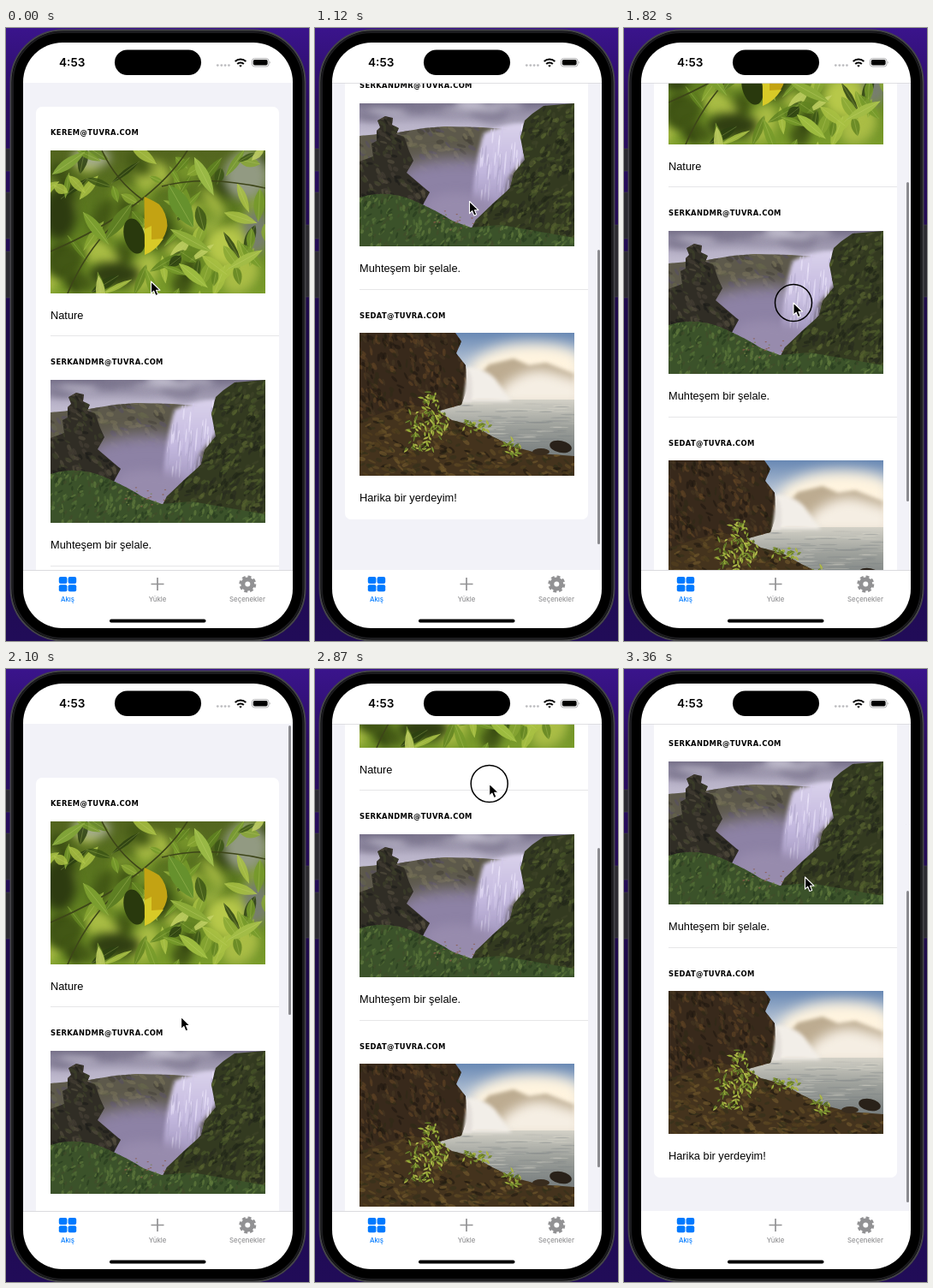
An HTML page with a canvas for the animation above (3.43 s loop, 354 by 716 pixels).

```html
<!DOCTYPE html>
<html lang="tr">
<head>
<meta charset="utf-8">
<title>Akış</title>
<style>
html, body { margin: 0; width: 100%; height: 100%; overflow: hidden; }
#stage { position: relative; width: 354px; height: 716px; overflow: hidden; }
#stage > svg { position: absolute; left: 0; top: 0; }
#view { position: absolute; left: 20px; top: 64px; width: 315px; height: 569px; overflow: hidden; background: #f2f2f8; }
#card { position: absolute; left: 15px; top: 28px; width: 284px; height: 805.2px; border-radius: 7px; background: #fff; will-change: transform; }
.row { position: relative; height: 268.4px; color: #000; white-space: nowrap; }
.row > * { position: absolute; left: 17px; }
.mail { top: 24.1px; font: bold 8.4px/12px "DejaVu Sans", sans-serif; letter-spacing: .35px; }
.row canvas { top: 50.5px; width: 251px; height: 167px; }
.note { top: 235.6px; font: 12.8px/16px "Liberation Sans", Arial, sans-serif; }
.row:not(:last-child)::after { content: ""; position: absolute; left: 17px; right: 0; bottom: 0; height: 1px; background: #e6e6e8; }
#thumb { position: absolute; left: 309.8px; width: 2.8px; border-radius: 2px; background: #8b8b90; }
text { font-family: Inter, sans-serif; }
.tab text { font-size: 7.8px; font-weight: 500; text-anchor: middle; }
</style>
</head>
<body>
<div id="stage">
  <svg width="354" height="716">
    <defs>
      <linearGradient id="wall" x2="0" y2="1">
        <stop offset="0" stop-color="#3a148c"/><stop offset=".12" stop-color="#2b0d63"/>
        <stop offset=".5" stop-color="#1d0a48"/><stop offset="1" stop-color="#210c58"/>
      </linearGradient>
    </defs>
    <rect width="354" height="716" fill="url(#wall)"/>
    <g fill="#2c2b31" stroke="#46454b" stroke-width=".6">
      <rect x="-3" y="141" width="9" height="26" rx="1.5"/>
      <rect x="-3" y="192" width="9" height="54" rx="1.5"/>
      <rect x="-3" y="261" width="9" height="54" rx="1.5"/>
      <rect x="348" y="230" width="9" height="84" rx="1.5"/>
    </g>
    <rect x="5.5" y="2.5" width="344" height="713" rx="61" stroke="#454549" stroke-width="2"/>
    <rect x="8" y="5" width="339" height="708" rx="58" fill="none" stroke="#1c1c1f" stroke-width="2"/>
    <rect x="20" y="17" width="315" height="684" rx="46" fill="#fff"/>
  </svg>

  <div id="view"><div id="card"></div><div id="thumb"></div></div>

  <svg width="354" height="716">
    <path id="topLine" d="M20 64.5H335" stroke="#d8d8dc" stroke-width=".8"/>
    <path id="tabLine" d="M20 633.5H335" stroke="#d2d2d6" stroke-width=".8"/>
    <text x="62" y="45" font-size="13.6" font-weight="600">4:53</text>
    <rect x="127" y="25.5" width="101" height="29.5" rx="14.75"/>
    <g fill="#bdbdc0">
      <circle cx="247.3" cy="43.6" r="1.4"/><circle cx="251.8" cy="43.6" r="1.4"/>
      <circle cx="256.1" cy="43.6" r="1.4"/><circle cx="260.4" cy="43.6" r="1.4"/>
    </g>
    <g fill="none" stroke="#000" stroke-width="2">
      <path d="M267.7 39a9 9 0 0 1 12.6 0M270.2 42a5.4 5.4 0 0 1 7.6 0"/>
      <path d="M272.2 43.8L274 45.8L275.8 43.8Q274 42.6 272.2 43.8" fill="#000" stroke="none"/>
    </g>
    <rect x="287.4" y="35.6" width="19.6" height="9.4" rx="3" fill="none" stroke="#a5a5a7" stroke-width=".9"/>
    <rect x="288.8" y="37" width="16.8" height="6.6" rx="1.8"/>
    <path d="M308 38.8q1.6 1.5 0 3z" fill="#a5a5a7"/>

    <g class="tab" fill="#007aff">
      <rect x="61.8" y="641" width="9.6" height="8" rx="2"/><rect x="72.6" y="641" width="9.6" height="8" rx="2"/>
      <rect x="61.8" y="650.2" width="9.6" height="8" rx="2"/><rect x="72.6" y="650.2" width="9.6" height="8" rx="2"/>
      <text x="72" y="670">Akış</text>
    </g>
    <g class="tab" fill="#929294">
      <path d="M169.5 649.5h15M177 642v15" stroke="#929294" stroke-width="1.7"/>
      <text x="177" y="670">Yükle</text>
      <circle cx="282.3" cy="649.5" r="5.5" fill="none" stroke="#929294" stroke-width="5"/>
      <circle cx="282.3" cy="649.5" r="8.6" fill="none" stroke="#929294" stroke-width="2.8" stroke-dasharray="3.9 2.855"/>
      <text x="282" y="670">Seçenekler</text>
    </g>
    <rect x="121" y="690.6" width="112.5" height="3.8" rx="1.9"/>
    <g id="cursor">
      <circle id="touch" r="21.5" fill="#fff" fill-opacity=".12" stroke="#000" stroke-width="1.5"/>
      <path d="M0 0V14.2L3.2 11.2L5.4 16.6L8.2 15.4L6 10.2H10.4Z" stroke="#fff" stroke-width="1.1" stroke-linejoin="round"/>
    </g>
  </svg>
</div>

<script>
const $ = id => document.getElementById(id);
const W = 251, H = 167;
let seed = 7;
const rnd = (a = 0, b = 1) => {
  seed = (seed * 16807) % 2147483647;
  return a + (b - a) * seed / 2147483647;
};
const pick = list => list[Math.floor(rnd(0, list.length))];

function shape(c, d, fill, blur = 0) {
  c.filter = blur ? `blur(${blur}px)` : 'none';
  c.fillStyle = fill;
  c.fill(new Path2D(d));
  c.filter = 'none';
}

function dot(c, x, y, rx, ry, turn, fill) {
  c.fillStyle = fill;
  c.beginPath();
  c.ellipse(x, y, rx, ry, turn, 0, 7);
  c.fill();
}

// Fills an outline, then roughens its inside with small random strokes.
function rough(c, d, fill, colors, n, size, turn = 0) {
  shape(c, d, fill);
  c.save();
  c.clip(new Path2D(d));
  c.globalAlpha = .6;
  for (let i = 0; i < n; i++)
    dot(c, rnd(0, W), rnd(0, H), rnd(.6, 1) * size, rnd(.2, .5) * size, turn + rnd(-.7, .7), pick(colors));
  c.restore();
}

function fade(c, y0, y1, ...colors) {
  const g = c.createLinearGradient(0, y0, 0, y1);
  colors.forEach((k, i) => g.addColorStop(i / (colors.length - 1), k));
  return g;
}

function leaf(c, x, y, len, wide, turn, fill) {
  c.save();
  c.translate(x, y);
  c.rotate(turn);
  shape(c, `M0 0Q${len * .45} ${-wide} ${len} 0Q${len * .45} ${wide} 0 0`, fill);
  c.strokeStyle = 'rgba(205,220,120,.4)';
  c.lineWidth = .7;
  c.beginPath();
  c.moveTo(0, 0);
  c.lineTo(len, 0);
  c.stroke();
  c.restore();
}

function leaves(c) {
  shape(c, 'M0 0H251V167H0z', fade(c, 0, H, '#53651f', '#5d7c20', '#7a9c2b'));
  const soft = ['#30400f', '#8aa43a', '#aabd45', '#425715', '#75932a'];
  c.filter = 'blur(6px)';
  for (let i = 0; i < 45; i++) dot(c, rnd(0, W), rnd(0, H), rnd(8, 24), rnd(6, 18), rnd(0, 3), pick(soft));
  dot(c, 48, 8, 22, 12, 0, '#a3aa8e');
  dot(c, 228, 30, 26, 28, 0, '#929a82');
  dot(c, 240, 95, 16, 26, 0, '#777d70');
  dot(c, 10, 75, 20, 30, 0, '#2d3b10');
  dot(c, 75, 145, 30, 14, 0, '#303e12');
  dot(c, 205, 112, 24, 24, 0, '#b7c84a');
  c.filter = 'none';
  const greens = ['#87a632', '#a9c143', '#618421', '#3b5515', '#769a2a', '#2c4011', '#c1d063'];
  c.globalAlpha = .85;
  for (let i = 0; i < 75; i++) leaf(c, rnd(-10, W), rnd(-10, H), rnd(18, 46), rnd(6, 13), rnd(.2, 2.7), pick(greens));
  c.globalAlpha = 1;
  c.strokeStyle = '#3d4518';
  c.lineWidth = 1.6;
  c.stroke(new Path2D('M0 118Q60 92 100 62T160 0M60 0Q76 35 108 58M130 42Q180 28 251 44M20 167Q40 120 72 88'));
  leaf(c, 2, 28, 46, 12, -.6, '#80a338');
  leaf(c, 38, 72, 48, 13, .9, '#7b9e2f');
  leaf(c, 95, 62, 52, 15, 2.2, '#5e7f23');
  leaf(c, 138, 40, 58, 22, 1.05, '#66912d');
  leaf(c, 168, 8, 50, 13, 1.1, '#98b845');
  leaf(c, 140, 92, 55, 12, .5, '#8dac39');
  leaf(c, 208, 138, 45, 11, -.5, '#a2bc46');
  leaf(c, 150, 132, 44, 12, .7, '#9cbb3f');
  dot(c, 98, 100, 12, 21, -.25, '#29390d');
  shape(c, 'M109.5 54Q121 59 127 63Q136 73 136.500 88Q134 108 110 122z', '#c3a313');
  shape(c, 'M110 92L118 88V104L132 103Q122 118 110 122z', '#d8ca27');
}

function falls(c) {
  shape(c, 'M0 0H251V80H0z', fade(c, 0, 50, '#77718a', '#b8b2c8', '#cbc6d8'));
  c.filter = 'blur(4px)';
  c.globalAlpha = .65;
  for (let i = 0; i < 16; i++) dot(c, rnd(0, 210), rnd(0, 22), rnd(12, 28), rnd(2, 5), .1, pick(['#666078', '#d8d4e2', '#918aa2']));
  c.filter = 'none';
  c.globalAlpha = 1;
  rough(c, 'M0 38L45 34L75 29L100 27L142 28L170 30L200 40V120H0z', '#5d594b', ['#777258', '#454238', '#67674b', '#575160'], 650, 6, .5);
  shape(c, 'M50 75Q90 60 140 65L180 85L165 145H60Q40 100 50 75', '#8d82a5', 9);
  shape(c, 'M145 35Q165 25 192 23L194 62L174 86L158 128H130Q135 65 145 35', fade(c, 25, 128, '#d9d1eb', '#c4b9df', '#9d91b9'), 2);
  c.save();
  c.clip(new Path2D('M143 32L193 23V72L158 128H130z'));
  c.globalAlpha = .55;
  for (let i = 0; i < 70; i++) dot(c, rnd(133, 193), rnd(28, 115), .9, rnd(5, 16), .08, pick(['#f2edff', '#aaa0c5', '#d4cbe9']));
  c.restore();
  shape(c, 'M80 112Q115 96 158 116V148H75z', '#978bad', 6);
  rough(c, 'M0 68L16 62L14 47L20 44L20 32L24 28L21 20L30 15L39 17L38 25L46 29L43 36L52 39L58 56L63 67L55 81L82 104L70 126H0z',
    '#302d25', ['#464036', '#1c1b18', '#3f412a', '#575040'], 700, 5, .8);
  rough(c, 'M251 0L215 3L202 12L193 20L188 40L193 66L180 82L176 99L157 116L136 136L128 152V167H251z',
    '#333a20', ['#1f2317', '#4b5a2a', '#404529', '#5b6731', '#282c1f'], 1200, 5, -.8);
  rough(c, 'M0 110Q32 100 62 113T108 137L130 145L165 142L251 157V167H0z',
    '#3b522a', ['#536e36', '#263a1d', '#678040', '#414b2b'], 1200, 4, -1.1);
  c.globalAlpha = .8;
  for (let i = 0; i < 22; i++) dot(c, rnd(85, 135), rnd(125, 148), 1.2, .7, 0, pick(['#8b5947', '#768347']));
  c.globalAlpha = 1;
}

function shore(c) {
  shape(c, 'M0 0H251V90H0z', fade(c, 0, 75, '#6888b4', '#b9c6d6', '#efe4d2'));
  shape(c, 'M130 36Q155 12 200 12T260 28V85H130z', '#fff4df', 8);
  shape(c, 'M135 55L151 37L180 30L198 38L218 35L251 48V82H135z', '#bdac91', 2);
  shape(c, 'M165 65Q195 37 225 46T260 56V86H160z', '#f5eee3', 7);
  shape(c, 'M90 78H251V148H90z', fade(c, 78, 140, '#d3d1c7', '#9da09b', '#7a8080'));
  c.globalAlpha = .3;
  for (let i = 0; i < 90; i++) dot(c, rnd(105, W), rnd(82, 130), rnd(6, 18), .7, 0, pick(['#e4e0d5', '#737c7d', '#b9bbb4']));
  c.globalAlpha = 1;
  shape(c, 'M122 41Q142 38 158 53L178 80H118z', '#f2eee8', 2);
  rough(c, 'M0 0H112L119 10L113 24L124 38L126 65L119 84L90 92L0 113z',
    '#38291b', ['#21180f', '#523b22', '#654725', '#463722', '#2f2a17'], 1000, 5, 1);
  shape(c, 'M126 42Q134 48 131 81H121z', '#e5e0db', 1.500);
  rough(c, 'M0 103L25 94L62 84L92 92L108 102L132 108L155 121L180 133L210 141L251 144V167H0z',
    '#44331d', ['#20190f', '#665027', '#755d2e', '#35311a', '#55421f'], 1000, 5, .2);
  dot(c, 235, 133, 13, 7, .2, '#292119');
  dot(c, 212, 139, 10, 4, 0, '#382c1e');
  const bush = (x, y, rx, ry, n) => {
    for (let i = 0; i < n; i++) {
      const a = rnd(0, 7), r = Math.sqrt(rnd());
      leaf(c, x + rx * r * Math.cos(a), y + ry * r * Math.sin(a), rnd(4, 8), 2.5, rnd(0, 6), pick(['#8c9e2c', '#667d20', '#a5ae3e', '#485d17']));
    }
  };
  bush(80, 105, 25, 20, 80);
  bush(83, 76, 9, 7, 22);
  bush(135, 108, 17, 6, 28);
  bush(178, 134, 11, 8, 25);
  bush(70, 132, 16, 7, 20);
}

const posts = [
  ['KEREM@TUVRA.COM', leaves, 'Nature'],
  ['SERKANDMR@TUVRA.COM', falls, 'Muhteşem bir şelale.'],
  ['SEDAT@TUVRA.COM', shore, 'Harika bir yerdeyim!']
];
for (const [mail, paint, note] of posts) {
  $('card').insertAdjacentHTML('beforeend',
    `<div class="row"><div class="mail">${mail}</div><canvas width="${W}" height="${H}"></canvas><div class="note">${note}</div></div>`);
  paint($('card').lastChild.querySelector('canvas').getContext('2d'));
}

const LOOP = 3430, STEP = 70, END = 294;
// Each key: time, then values.
const scroll = [[0, 0], [770, 0], [910, 190], [980, 265], [1050, 310], [1120, 323], [1260, 304], [1400, 295.5],
  [1500, END], [1680, END], [1820, 174], [1960, 32], [2030, -15], [2100, -35], [2240, -20], [2380, -7.5],
  [2560, 0], [2720, 0], [2870, 218], [2940, 287], [3010, 322], [3080, 334], [3220, 317], [3360, 303]];
const pointer = [[0, 169.5, 296], [560, 174, 300], [770, 188, 99.5], [840, 189, 72], [980, 185, 110], [1260, 176, 295],
  [1400, 174, 308], [1540, 184, 270], [1680, 192, 215], [1820, 198, 321], [1930, 204, 412], [2380, 205.5, 397],
  [2660, 204, 388], [2870, 203.7, 134], [2950, 205, 85], [3200, 209, 205], [3360, 211.5, 243]];
const presses = [[630, 840], [1680, 1900], [2660, 2950]];

function at(keys, t) {
  const i = keys.findIndex(k => k[0] > t);
  if (i < 0) return keys.at(-1).slice(1);
  const a = keys[i - 1], b = keys[i], p = (t - a[0]) / (b[0] - a[0]);
  return a.slice(1).map((v, j) => v + (b[j + 1] - v) * p);
}

function draw(now) {
  const t = Math.floor(now % LOOP / STEP) * STEP;
  const [s] = at(scroll, t), [x, y] = at(pointer, t);
  $('card').style.transform = `translateY(${-s}px)`;
  const inside = Math.min(END, Math.max(0, s));
  const thumb = $('thumb').style;
  thumb.top = 2 + inside * .656 + 'px';
  thumb.height = 373 - Math.abs(s - inside) + 'px';
  thumb.opacity = t > 770 ? 1 : 0;
  $('topLine').style.opacity = s > 1 ? 1 : 0;
  $('tabLine').style.opacity = s < END - 20 ? 1 : 0;
  $('cursor').setAttribute('transform', `translate(${x} ${y})`);
  $('touch').style.opacity = presses.some(([a, b]) => t >= a && t <= b) ? 1 : 0;
}

const start = performance.now();
function loop() {
  draw(performance.now() - start);
  requestAnimationFrame(loop);
}
loop();
</script>
</body>
</html>
```
